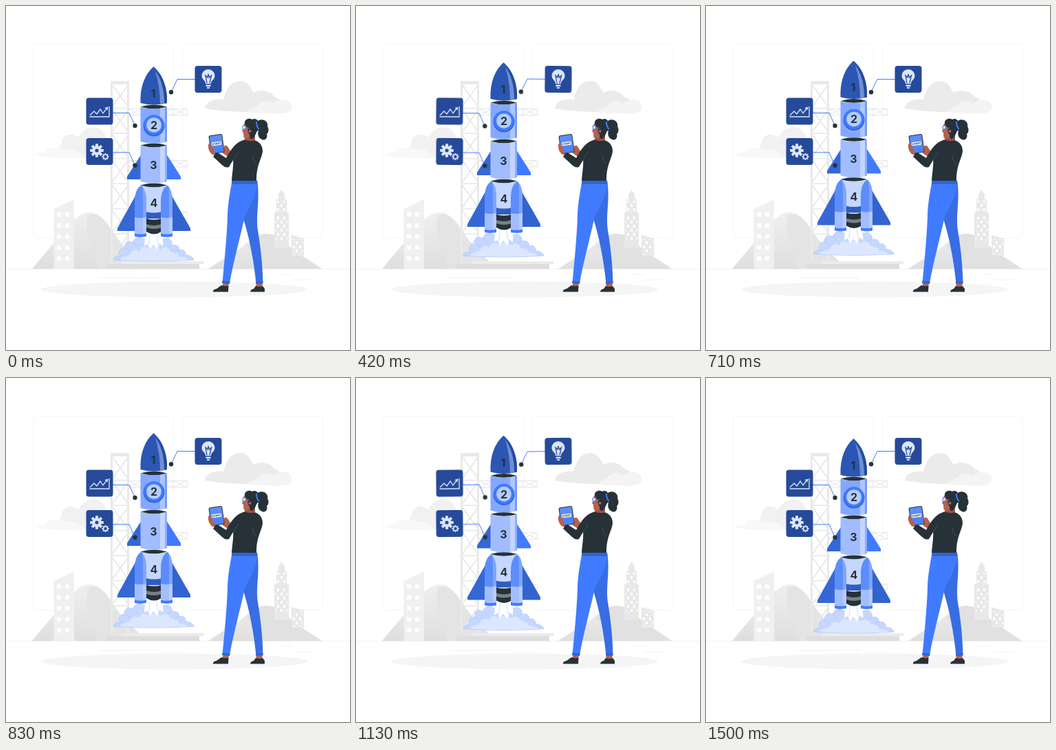
These frames come from a looping animation (500 by 500 pixels, 1.54 s). An HTML page without scripts:

```html
<!DOCTYPE html>
<html lang="en">
<head>
<meta charset="utf-8">
<title>Rocket launch</title>
<style>
  html, body { margin: 0; width: 100%; height: 100%; overflow: hidden; background: #fff; }
  svg { display: block; width: 100%; height: 100%; }
  text { font-family: Inter, "Open Sans", sans-serif; font-weight: 700; text-anchor: middle; }
  .rocket { animation: hover 1540ms linear infinite; }
  .card { animation: sway 1540ms ease-in-out infinite; transform-box: view-box; }
  .chart { transform-origin: 136px 153px; }
  .gears { transform-origin: 136px 212px; }
  .bulb { transform-origin: 294px 106.5px; }
  .link { fill: none; stroke: #407bff; stroke-width: 1; }
  .tile { fill: #264a99; }
  .dark { fill: #263238; }
  @keyframes hover {
    0% { transform: translateY(0); }
    13.64% { transform: translateY(-2.9px); }
    27.27% { transform: translateY(-6px); }
    37.66% { transform: translateY(-8px); }
    45.78% { transform: translateY(-8.6px); }
    53.9% { transform: translateY(-8px); }
    73.38% { transform: translateY(-4.4px); }
    86% { transform: translateY(-1.4px); }
    95.8%, 100% { transform: translateY(0); }
  }
  @keyframes sway {
    0%, 50%, 100% { transform: rotate(0); }
    25% { transform: rotate(.6deg); }
    75% { transform: rotate(-.6deg); }
    0%, 50% { animation-timing-function: ease-out; }
    25%, 75% { animation-timing-function: ease-in; }
  }
</style>
</head>
<body>
<svg viewBox="0 0 500 500" xmlns="http://www.w3.org/2000/svg">
  <defs>
    <linearGradient id="hill" x1="0" y1="0" x2="0" y2="1">
      <stop offset="0" stop-color="#efefef"/><stop offset="1" stop-color="#dfdfdf"/>
    </linearGradient>
    <pattern id="truss" x="154" y="114" width="24" height="36.5" patternUnits="userSpaceOnUse">
      <path d="M0 0 24 33M24 0 0 33M0 34.8H24" fill="none" stroke="#e6e6e6" stroke-width="1.6"/>
    </pattern>
    <pattern id="windows" x="74" y="300" width="12" height="16" patternUnits="userSpaceOnUse">
      <path d="M0 0h6v6h-6z" fill="#fff"/>
    </pattern>
    <pattern id="panes" x="393" y="306" width="9" height="12" patternUnits="userSpaceOnUse">
      <path d="M1 0h3v4h-3zM6 6h3v4h-3z" fill="#fff"/>
    </pattern>
    <g id="arm" fill="none" stroke="#e6e6e6" stroke-width="1">
      <path d="M178 .5H263.5V10H178M198 0V10M220 0V10M242 0V10M178 10 198 0 220 10 242 0 263 10M178 0 198 10 220 0 242 10 263 0"/>
    </g>
    <g id="gear">
      <circle r="6.8"/>
      <path d="M0-9.8V9.8M-9.8 0H9.8M-6.9-6.9 6.9 6.9M6.9-6.9-6.9 6.9" stroke="#dbe6ff" stroke-width="4"/>
    </g>
    <g id="booster">
      <path d="M187 335V284C187 272 191 263 197 261C202 266 204 274 204 284V335Q195.500 337 187 335Z" fill="#5c8dfb"/>
      <path d="M187 307Q195.500 309 204 307V332H187Z" fill="#a3beff"/>
      <path d="M198 261.500C202 266 204 274 204 284V332H199V284Q199 270 198 261.500Z" fill="#fff" opacity=".22"/>
      <path d="M187 330.500Q195.500 333 204 330.500V334Q195.500 336.500 187 334Z" fill="#407bff"/>
    </g>
    <path id="rim" class="dark" d="M195.500 0Q215-6 234 0Q215 5.500 195.500 0Z"/>
  </defs>

  <!-- Backdrop -->
  <g fill="none" stroke="#f7f7f7">
    <rect x="39.500" y="55.500" width="204" height="282" rx="3"/>
    <rect x="256.500" y="55.500" width="204" height="282" rx="3"/>
  </g>
  <path d="M38 382C52 365 66 348 82 331C96 312 108 300 122 300C137 300 147 315 156 330C168 348 190 367 204 382Z" fill="url(#hill)"/>
  <path d="M118 306C125 299 137 304 147 316C162 340 182 365 204 382H134C128 368 134 356 124 345C114 333 118 322 118 306Z" fill="#e4e4e4"/>
  <path d="M69.500 295 99 281V382H69.500Z" fill="#f0f0f0"/>
  <path d="M73 299H93V378H73Z" fill="url(#windows)"/>
  <path d="M294 382C312 370 325 362 338 354C349 346 360 331 377 331C397 331 407 346 421 357L459 382Z" fill="url(#hill)"/>
  <path d="M350 349C361 337 366 332 378 331C397 331 407 346 421 357L459 382H368C354 372 363 363 350 349Z" fill="#e1e1e1"/>
  <path d="M390 352V300H393V281H396V274L400.500 267 405 274V281H408V300H411V352ZM415 363V333L433 338V363Z" fill="#e8e8e8"/>
  <path d="M394 283h13v17h-13zM392 304h17v37h-17zM417 339h14v22h-14z" fill="url(#panes)"/>
  <path d="M43 217C47 211 53 214 58 212C60 205 67 204 73 207C79 209 80 200 82 193C89 184 98 186 105 191C112 177 130 171 139 181C148 188 145 198 151 202L154 218C133 222 70 222 43 217Z" fill="#f1f1f1"/>
  <path d="M43 217C47 211 53 214 58 212C60 205 67 204 73 207C82 205 92 211 99 209C105 211 111 216 116 220C91 222 63 221 43 217Z" fill="#f8f8f8"/>
  <path d="M289 149C290 139 302 134 316 136C320 123 325 109 341 109C352 109 355 119 360 126C371 120 385 124 390 132C401 135 406 146 400 153C366 156 315 154 289 149Z" fill="#ebebeb"/>
  <path d="M351 154C356 147 361 149 365 145C373 135 383 138 388 142C396 134 412 134 415 144C418 155 406 156 396 157C379 155 366 157 351 154Z" fill="#f4f4f4"/>
  <path d="M0 382.500H500M135 395.500H197M200 395.500H224M402 390H416M222 402H236M418 398H449" stroke="#ececec" stroke-width=".7"/>
  <ellipse cx="245" cy="412" rx="193.500" ry="11.500" fill="#f5f5f5"/>

  <!-- Launch tower and pad -->
  <path d="M154 114H178V371H154Z" fill="url(#truss)"/>
  <path d="M152 109H179V114H152ZM152 114H155V371H152ZM176 114H179V371H176Z" fill="#e9e9e9"/>
  <use href="#arm" y="149"/><use href="#arm" y="224"/><use href="#arm" y="299"/>
  <path d="M168 371H287V375H168Z" fill="#ebebeb"/>
  <path d="M146 375H281V382H146Z" fill="#dedede"/>

  <g class="rocket">
    <!-- Smoke -->
    <g stroke="#a9c3ff" stroke-width=".7">
      <path d="M156 369C157 364 163 362 167 364C161 357 167 350 173 352C171 343 178 340 184 344C186 336 196 334 200 339C208 336 222 336 230 339C236 335 243 342 241 348C248 346 253 350 251 355C258 352 262 358 261 362C268 362 272 366 273 369Q215 373 156 369Z" fill="#c6d7ff"/>
      <path d="M165 369C170 362 178 365 181 360C184 353 191 354 194 357C196 349 203 349 207 353C212 349 221 349 225 354C231 348 239 352 239 358C246 356 251 361 252 365Q259 364 265 369Q213 372 165 369Z" fill="#dce7ff" stroke="none"/>
      <path d="M173 352Q178 352 179 357M184 344Q190 345 190 350M241 348Q236 348 235 352M251 355Q246 355 245 360" fill="none"/>
    </g>
    <path d="M204 330H226Q229 341 228 349L223 345 220 354 214 347 209 354 206 346 201 349Q201 339 204 330Z" fill="#fff"/>
    <path d="M209 332 208 347M219 332 221 347" stroke="#dce7ff" stroke-width="1.500"/>

    <!-- Fins -->
    <path d="M197 215 176 248V252H197ZM188 276 162 323V327H188Z" fill="#3568d4"/>
    <path d="M233 215 254 248V252H233Z" fill="#407bff"/>
    <path d="M241 276 268 323V327H241Z" fill="#3264cf"/>

    <!-- Fourth stage -->
    <path d="M195.500 260H234V302H195.500Z" fill="#c6d7ff"/>
    <path d="M203 299Q215 302 227 299V309H203Z" fill="#305dc0"/>
    <path d="M204 309Q215 312 226 309V328Q215 335 204 328Z" class="dark"/>
    <path d="M204 317Q215 321 226 317V322Q215 326 204 322Z" fill="#758087"/>
    <use href="#booster"/><use href="#booster" x="38"/>
    <use href="#rim" y="260.500"/>

    <!-- Third stage -->
    <path d="M195.500 203Q215 208 234 203V255Q215 261 195.500 255Z" fill="#a1bdff"/>
    <path d="M224 205.300 231 204V256L224 257.500Z" fill="#c4d6ff"/>
    <path d="M231 204 234 203V255L231 256Z" fill="#8dafff"/>
    <use href="#rim" y="202.500"/>

    <!-- Second stage -->
    <path d="M195.500 147Q215 152 234 147V197Q215 203 195.500 197Z" fill="#84a8ff"/>
    <path d="M224 149.300 231 148V198L224 199.500Z" fill="#adc6ff"/>
    <path d="M231 148 234 147V197L231 198Z" fill="#709aff"/>
    <circle cx="215" cy="174" r="15.500" fill="#3568d4"/>
    <circle cx="215" cy="172.800" r="14.500" fill="#407bff"/>
    <circle cx="215" cy="173" r="10.800" fill="#b6ccff"/>
    <use href="#rim" y="146.500"/>

    <!-- Nose -->
    <path d="M214.500 88C227 99 235 117 234 141Q215 146 195.500 141C194.500 117 202 99 214.500 88Z" fill="#2c56b3"/>
    <path d="M217 95C225 105 230 121 230 142L224 143Q224 117 217 95Z" fill="#6e8fd2"/>
    <path d="M219 93C228 104 235 121 234 141L231 142Q231 114 219 93Z" fill="#264a99"/>

    <g class="dark" font-size="16">
      <text x="214" y="133">1</text><text x="215" y="179">2</text>
      <text x="214.500" y="237">3</text><text x="215" y="292">4</text>
    </g>
  </g>

  <!-- Callouts -->
  <g class="card chart">
    <path class="link" d="M155 155.500H179L187.500 174"/>
    <circle class="dark" cx="187.500" cy="174" r="3.200"/>
    <rect class="tile" x="116.500" y="133.500" width="39" height="39" rx="4"/>
    <path d="M121.500 161H150V146M122 159 128 153 132 157 137 150 141 156 147 148" fill="none" stroke="#dbe6ff" stroke-width="1.300"/>
    <path d="M143.500 148 148.500 146.500 147.500 151.500Z" fill="#dbe6ff"/>
  </g>
  <g class="card gears">
    <path class="link" d="M155 212.800H179L187.500 232"/>
    <circle class="dark" cx="187.500" cy="231.800" r="3.200"/>
    <rect class="tile" x="116.500" y="192" width="39" height="39" rx="4"/>
    <g fill="#dbe6ff">
      <use href="#gear" x="132" y="210"/>
      <use href="#gear" transform="translate(144.500 219) scale(.52)"/>
    </g>
    <circle class="tile" cx="132" cy="210" r="2.600"/>
    <circle class="tile" cx="144.500" cy="219" r="2.200"/>
  </g>
  <g class="card bulb">
    <path class="link" d="M275 106.500H249L240 125"/>
    <circle class="dark" cx="240" cy="125.300" r="3.200"/>
    <rect class="tile" x="274.500" y="87" width="39" height="39" rx="4"/>
    <path d="M290 113C290 108 284.500 107 284.500 101.500A9.500 9.500 0 0 1 303.500 101.500C303.500 107 298 108 298 113ZM290.500 114.500H297.500V117H290.500ZM291.500 118H296.500L295.500 120H292.500Z" fill="#dbe6ff"/>
    <path d="M292 112 290 101 293 104 294 99 295.500 104 298.500 101 296 112" fill="none" stroke="#264a99" stroke-width="1.300"/>
  </g>

  <!-- Woman -->
  <g>
    <path d="M316 401H324L323 409H314ZM364 401H373L372 410H363Z" fill="#b5614f"/>
    <path class="dark" d="M313 406Q318 408 323.500 406.500L323 415.500H301Q300 412 306 411ZM363 407Q368 409 373 407L376 411V415.500H355Q355 412 360 411Z"/>
    <path d="M341 256 365.500 256C369 285 363 301 366 326C370 350 373 376 373.500 402L363.500 403C360 369 354 337 344 306Z" fill="#386de3"/>
    <path d="M328.500 254H365.500C364 278 356 287 347 306C340 338 330 374 325 403L314.500 402C318 367 321 333 322 306C322 288 326 270 328.500 254Z" fill="#407bff"/>
    <path d="M328.500 253.500H364.500L365 259H328ZM314.500 399.500 325.500 400 325 404 314 403ZM363 400H373.500V403.500L363.500 404Z" fill="#3264cf"/>
    <path d="M315 214C315 205 317 202 321 203C324 206 325 210 328 213L324 220ZM295 204Q295 199 298 200L308 214 306 219Q298 214 295 209Z" fill="#b5614f"/>
    <path class="dark" d="M328 254C329 241 331 230 330 224L324 234Q319 236 314 231L301 219 306 212 320 221C326 210 332 201 340 197Q347 193 355 194C368 195 373 202 373 211C372 222 364 230 364 254Z"/>
    <path d="M330 224 338 212M364 230Q359 226 358 218" fill="none" stroke="#4a565c" stroke-width=".8"/>

    <path d="M348 181 362 180V195Q354 198 347 194Z" fill="#9f5145"/>
    <path d="M346 171C344 176 345 179 343 182L345 184 345.500 191Q350 195 355 189L362 181 358 168Z" fill="#b5614f"/>
    <path class="dark" d="M347 171C346 165 353 162 358 165C362 162 366 166 366 167C373 162 382 168 380 175C383 180 381 185 379 186C381 192 376 196 372 194C365 191 366 184 367 181C364 180 364 188 358 193Q354 194 354 187Q350 182 352 178Q349 176 347 171Z"/>
    <path d="M364 168Q364 176 368 179" fill="none" stroke="#407bff" stroke-width="2"/>
    <path d="M344 174.500Q349 172.500 348.500 177Q346 181 344 178ZM348.500 176 354 178" fill="#dbe6ff" stroke="#407bff" stroke-width="1"/>
    <circle cx="354.500" cy="182" r="2" fill="#b5614f"/>

    <g transform="rotate(-8 306 200)">
      <rect x="296" y="187" width="20" height="27" rx="2.500" fill="#263238"/>
      <rect x="297" y="188" width="18" height="25" rx="1.500" fill="#5c8dfb"/>
      <path d="M297 203H315V213H297Z" fill="#407bff" opacity=".5"/>
      <rect x="299" y="197.500" width="14" height="5" rx="1" fill="#fff"/>
      <text x="306" y="201.500" font-size="4" fill="#263238">START</text>
    </g>
    <path d="M294 202Q295 198 297 200L301 207 304 214 300 216Q293 210 294 202ZM316 206Q318 202 321 204L325 210 321 213Z" fill="#b5614f"/>
  </g>
</svg>
</body>
</html>
```
